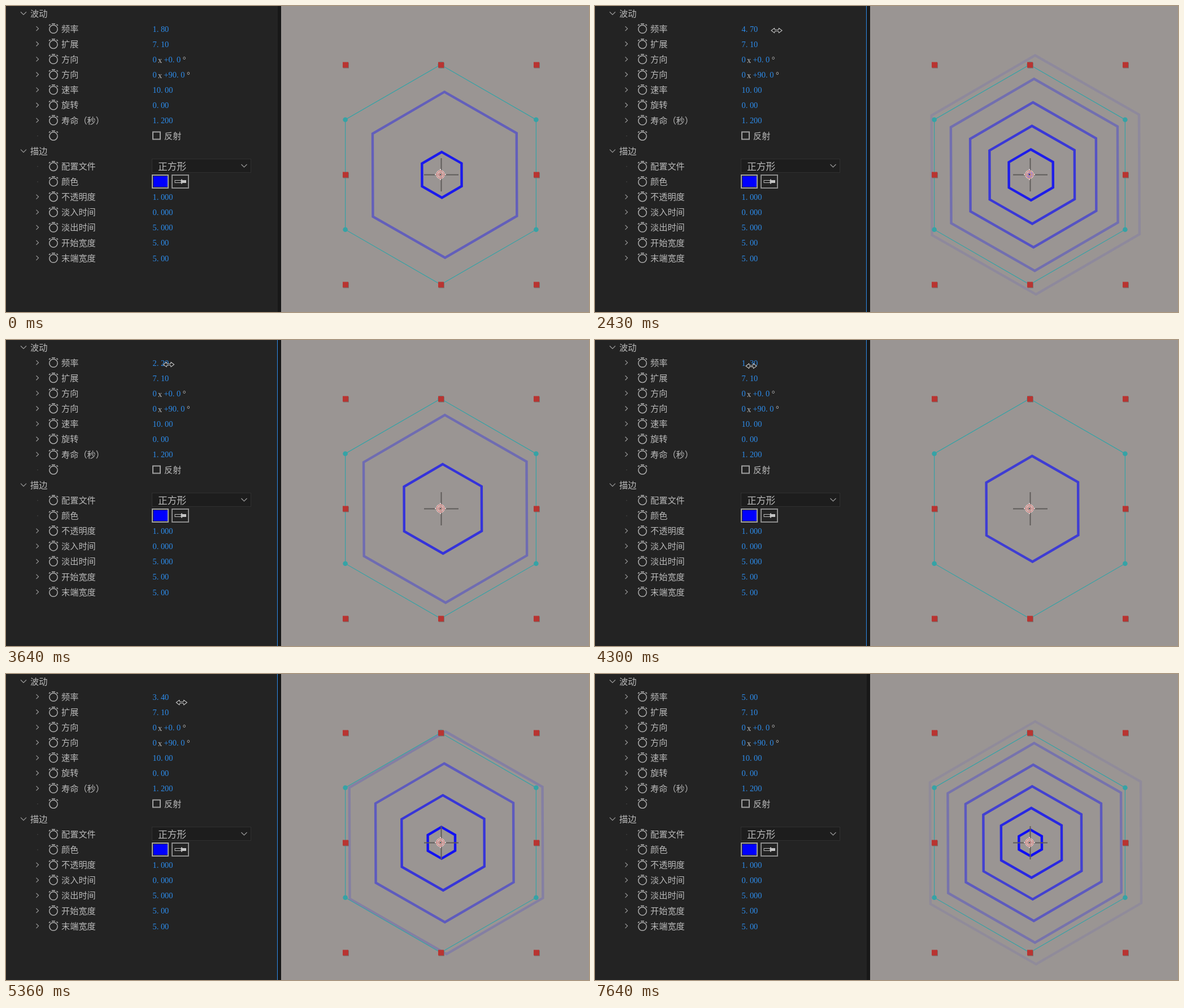
An HTML page with a canvas that plays this animation: 1032x543 px, repeating every 7.74 s.

```html
<!DOCTYPE html>
<html lang="zh-CN">
<head>
<meta charset="utf-8">
<title>波动</title>
<style>
html, body { margin: 0; width: 100%; height: 100%; overflow: hidden; background: #232323; }
canvas { display: block; }
</style>
</head>
<body>
<canvas id="stage" width="1032" height="543"></canvas>
<script>
const ctx = document.getElementById('stage').getContext('2d');
const LOOP = 7740, DRAG = 1670, DROP = 6370;
const BLUE = '#2d8ceb', TEAL = '#35a3a6', GREY = '#9a9a9a';
const CJK = '"Noto Sans CJK SC", "Noto Sans CJK", sans-serif';
const SERIF = '"Liberation Serif", serif';

// label, value, kind
const rows = [
  ['波动', '', 'head'],
  ['频率', '', 'num'],
  ['扩展', '7.10', 'num'],
  ['方向', '+0.0', 'angle'],
  ['方向', '+90.0', 'angle'],
  ['速率', '10.00', 'num'],
  ['旋转', '0.00', 'num'],
  ['寿命（秒）', '1.200', 'num'],
  ['', '', 'check'],
  ['描边', '', 'head'],
  ['配置文件', '', 'menu'],
  ['颜色', '', 'color'],
  ['不透明度', '1.000', 'num'],
  ['淡入时间', '0.000', 'num'],
  ['淡出时间', '5.000', 'num'],
  ['开始宽度', '5.00', 'num'],
  ['末端宽度', '5.00', 'num']
];

// Turning points of the scrubbed value: [time, value]
const scrub = [[DRAG, 1.8], [2430, 4.7], [2750, 5.7], [3100, 4.7], [3130, 4.2], [3250, 3],
  [3640, 2.17], [4000, 1.2], [4270, 1.2], [4760, 2], [5880, 4.7], [6200, 5]];

const mix = (a, b, u) => a + (b - a) * u;
const progress = (t, from, to) => Math.min(1, Math.max(0, (t - from) / (to - from)));

function scrubbed(t) {
  const i = scrub.findIndex(key => t < key[0]);
  if (i === 0) return scrub[0][1];
  if (i < 0) return scrub[scrub.length - 1][1];
  const [a, b] = [scrub[i - 1], scrub[i]];
  return mix(a[1], b[1], progress(t, a[0], b[0]));
}

const frequency = t => Math.round(scrubbed(t) * 10) / 10;

function rect(x, y, w, h, color) {
  ctx.fillStyle = color;
  ctx.fillRect(x, y, w, h);
}

function frame(x, y, w, h, color, width = 1) {
  ctx.strokeStyle = color;
  ctx.lineWidth = width;
  ctx.strokeRect(x, y, w, h);
}

function line(points, color, width = 1, close = false, fill = null) {
  ctx.beginPath();
  points.forEach(p => ctx.lineTo(p[0], p[1]));
  if (close) ctx.closePath();
  if (fill) { ctx.fillStyle = fill; ctx.fill(); }
  ctx.strokeStyle = color;
  ctx.lineWidth = width;
  ctx.stroke();
}

function disc(x, y, r, color) {
  ctx.beginPath();
  ctx.arc(x, y, r, 0, 7);
  ctx.fillStyle = color;
  ctx.fill();
}

function ring(x, y, r, color, width) {
  ctx.beginPath();
  ctx.arc(x, y, r, 0, 7);
  ctx.strokeStyle = color;
  ctx.lineWidth = width;
  ctx.stroke();
}

function text(s, x, y, font, color) {
  ctx.font = font;
  ctx.fillStyle = color;
  ctx.fillText(s, x, y);
}

const label = (s, x, y, size = 15.2) => text(s, x, y + 0.37 * size, `300 ${size}px ${CJK}`, '#bababa');

// The space after the point keeps every character on the digit grid
const value = (s, x, y, color = BLUE) =>
  text(s.replace('.', '. '), x, y + 5.5, `14.4px ${SERIF}`, color);

const chevronDown = (x, y) => line([[x - 5, y - 2.5], [x, y + 2.5], [x + 5, y - 2.5]], GREY, 1.2);
const chevronRight = (x, y) => line([[x - 2, y - 4], [x + 2, y], [x - 2, y + 4]], GREY, 1.2);

function stopwatch(x, y) {
  const color = '#aeaeae';
  ring(x, y + 1, 7.2, color, 1.5);
  line([[x - 3, y - 8.5], [x + 3, y - 8.5]], color, 1.6);
  for (const side of [-1, 1])
    line([[x + side * 8, y - 5.5], [x + side * 5.5, y - 7.5]], color, 1.6);
}

function pipette(x, y) {
  frame(x - 9, y - 2, 11, 4, '#b8b8b8');
  rect(x + 2, y - 4, 2, 8, '#c4c4c4');
  rect(x + 4, y - 2.5, 7, 5, '#c4c4c4');
}

const controls = {
  num(y, s) {
    value(s, 259.5, y);
  },
  angle(y, s) {
    value('0', 259.5, y);
    value('x', 269, y + 1, '#b8b8b8');
    value(s, 279.5, y);
    value('°', 284 + s.length * 7.2, y, '#c0c0c0');
  },
  check(y) {
    frame(260, 223.5, 13, 13, '#a0a0a0', 2);
    label('反射', 280, y);
  },
  menu() {
    rect(259, 271, 175, 25, '#1d1d1d');
    frame(258.5, 271.5, 175, 24, '#303030');
    label('正方形', 269, 284.8, 16.8);
    chevronDown(421.5, 283.5);
  },
  color() {
    rect(261, 302, 25, 19, '#0000ff');
    frame(259, 300, 28, 23, '#a0a0a0', 2);
    frame(294, 300, 29, 23, '#8c8c8c', 2);
    pipette(308, 311.5);
  }
};

function drawRow([name, s, kind], i) {
  const y = 13 + 27.13 * i;
  if (kind === 'head') {
    chevronDown(31, y);
    label(name, 43, y);
    return;
  }
  if (kind === 'num' || kind === 'angle') chevronRight(55.5, y);
  else rect(55, y, 2, 1, '#484848');
  stopwatch(84, y);
  label(name, 98, y);
  controls[kind](y, s);
}

function drawPanel(t) {
  rect(0, 0, 482, 543, '#232323');
  rect(481, 0, 7, 543, '#181818');
  if (t >= DRAG && t < 7640) rect(480, 0, 1, 543, BLUE);
  rows[1][1] = frequency(t).toFixed(2);
  rows.forEach(drawRow);
}

function hexagon(x, y, r, turn = 0) {
  return [0, 1, 2, 3, 4, 5].map(i => {
    const a = i * Math.PI / 3 - Math.PI / 2 + turn;
    return [x + r * Math.cos(a), y + r * Math.sin(a)];
  });
}

// Waves are born every 1/f seconds; the view is held 1.322 s after the first
function drawWaves(f) {
  const life = 1.2;
  for (let n = 1; n < 1.322 * f; n++) {
    const age = 1.322 - n / f;
    if (age >= life) continue;
    ctx.globalAlpha = 1 - age / life;
    line(hexagon(769.5 + 9.3 * age, 299.6, 192 * age, -0.004), '#0000ff', 4.4, true);
  }
  ctx.globalAlpha = 1;
}

function drawTarget(x, y) {
  line([[x - 29, y + 0.5], [x + 32, y + 0.5]], '#605c5a', 2);
  line([[x + 1.5, y - 29], [x + 1.5, y + 30]], '#605c5a', 2);
  for (const r of [6.5, 3.3]) {
    ring(x, y, r, '#f2e2e0', 2.6);
    ring(x, y, r, '#b84440', 1);
  }
  for (const [dx, dy] of [[1, 0], [-1, 0], [0, 1], [0, -1]])
    line([[x + dx * 7, y + dy * 7], [x + dx * 10, y + dy * 10]], '#f0dada', 1.5);
}

function drawView(t) {
  rect(487, 0, 545, 543, '#9a9593');
  drawWaves(frequency(t - 30));
  const path = hexagon(769.5, 299.2, 195);
  line(path, TEAL, 1.2, true);
  path.forEach(([x, y], i) => { if (i % 3) disc(x, y, 4.3, TEAL); });
  ring(770, 104.5, 5.5, TEAL, 1);
  for (const x of [601, 770, 939])
    for (const y of [104.5, 299.5, 494.5]) {
      if (x === 770 && y === 299.5) continue;
      rect(x - 4, y - 4, 10, 10, '#77706e');
      rect(x - 5, y - 5, 10, 10, '#b93431');
    }
  drawTarget(769, 299);
}

function shape(points, x, y) {
  line(points.map(p => [p[0] + x, p[1] + y]), '#c4c4c4', 1.1, true, '#202020');
}

function doubleArrow(x, y) {
  const right = [[3, -1.2], [4, -4.2], [9.5, 0], [4, 4.2], [3, 1.2]];
  shape([...right, ...right.map(([px, py]) => [-px, -py])], x, y);
}

function hand(x, y) {
  shape([[-3, -9], [1, -9], [1, -3], [8, 0], [6, 9], [-3, 9], [-8, 1], [-3, 2]], x, y);
  doubleArrow(x, y + 12);
}

const arrow = (x, y) =>
  shape([[0, 0], [0, 19], [4.5, 15], [8, 23], [11, 21.5], [7.5, 14], [14, 14]], x, y);

function drawCursor(t) {
  if (t < 130 || t >= DROP) return;
  if (t < 1010) {
    const u = progress(t, 130, 600), v = progress(t, 880, 1010);
    arrow(mix(378, 253, u) + 7 * v, mix(494, 51, u));
  } else if (t < DRAG) {
    const u = progress(t, 1010, 1310);
    hand(mix(270, 276, u), mix(53, 48, u));
  } else {
    const drift = (t - 3300) / 400;
    doubleArrow(256 + 14.4 * scrubbed(t) + drift, 43.5 + Math.max(0, t - 3640) / 245);
  }
}

function draw() {
  const t = performance.now() % LOOP;
  drawPanel(t);
  drawView(t);
  drawCursor(t);
  requestAnimationFrame(draw);
}
draw();
</script>
</body>
</html>
```
